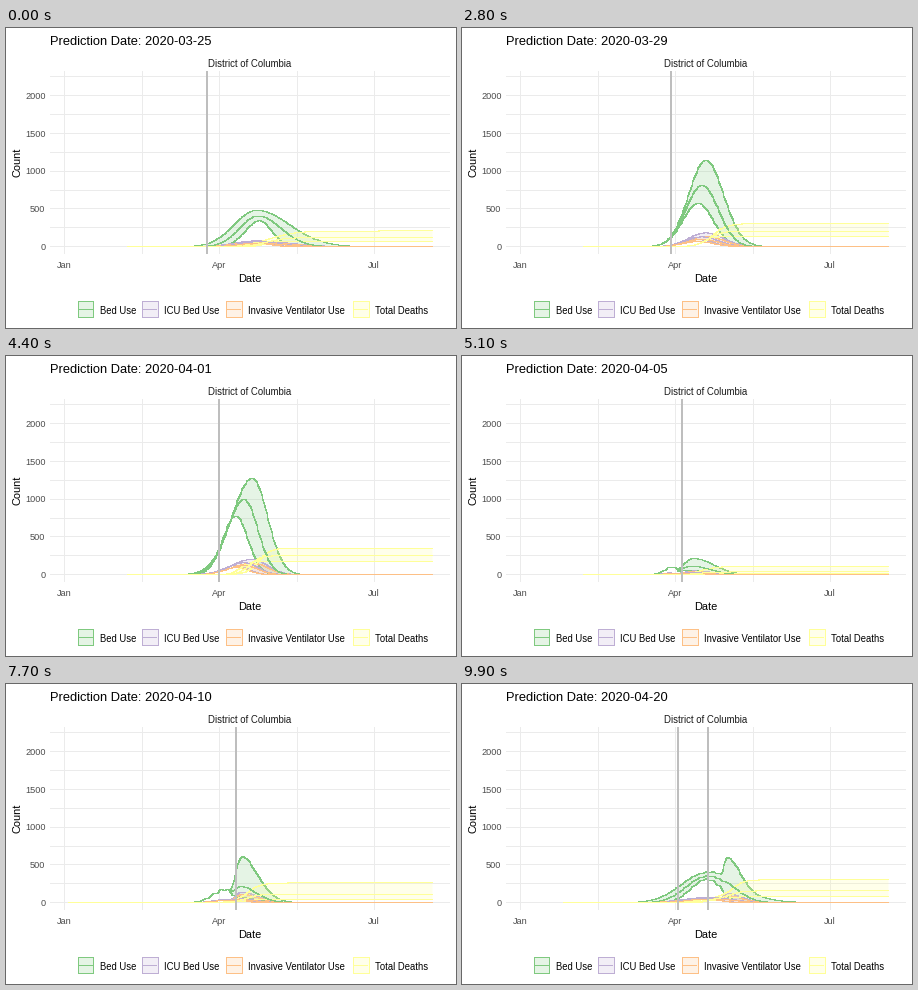
Write a matplotlib script that moves like this. It is 450 by 300 pixels and loops after 10000 ms.

```python
import numpy as np
import matplotlib
import matplotlib.pyplot as plt
from matplotlib.animation import FuncAnimation
from matplotlib.patches import Polygon, Rectangle

matplotlib.rcParams["font.family"] = "Liberation Sans"

W, H, DPI = 450, 300, 100
PT = 72 / DPI                      # points per pixel
LEFT, RIGHT, TOP, BOTTOM = 44, 444, 43, 226
ZERO, SCALE = 218.2, 0.0755        # pixel row of count 0, pixels per count
JAN, PER_DAY = 58.25, 155 / 91     # pixel column of 1 January, pixels per day
END, SAMPLES = 426, 366            # last column of the curves, points per curve

GROUPS = [("Bed Use", "#7FC97F", 79.5), ("ICU Bed Use", "#BEAED4", 144),
          ("Invasive Ventilator Use", "#FDC086", 228), ("Total Deaths", "#FFFF99", 355)]

# day of year (1 January = 0) of each prediction, and the frame it settles on
DAYS = [84, 85, 86, 88, 89, 90, 91, 95, 97, 98, 100, 103, 107, 110]
ARRIVE = [0, 6, 15, *range(23, 94, 7), 100]
FRAMES = ARRIVE[-1]

# (low, high) of: peak column, peak beds, rise width, fall width, deaths
FIRST = np.array([(253, 250), (342, 482), (14, 22), (12.5, 33), (70, 208)])
MAR29 = np.array([(237, 243), (550, 1125), (16, 16.5), (15, 18), (135, 300)])
MAR31 = np.array([(232, 245), (700, 1225), (14, 19), (13, 16), (165, 335)])
APR05 = np.array([(226, 231), (60, 215), (10, 10), (18, 20), (12, 110)])
APR08 = np.array([(229, 229), (72, 468), (8, 5), (16, 19), (30, 180)])
APR17 = np.array([(238, 242), (85, 920), (8, 5), (17, 15), (85, 425)])


def mix(a, b, t):
    return a + (b - a) * t


def column(day):
    return JAN + day * PER_DAY


def row(count):
    return ZERO - count * SCALE


def pixel(v):
    return np.round(v) + 0.5       # centre of the nearest pixel


# ---- curves -------------------------------------------------------------
def plan(day):
    if day < 88:
        return FIRST
    if day < 95:
        return mix(MAR29, MAR31, (day - 88) / 2)
    if day < 98:
        return APR05
    return mix(APR08, APR17, (day - 98) / 9)


def bell(x, peak, height, left, right):
    return height * np.exp(-0.5 * ((x - peak) / np.where(x < peak, left, right)) ** 2)


def observed(x, day):
    """Beds reported so far: a slightly jagged rise that ends before today."""
    cut = column(day) - 10
    age = cut - 210
    return bell(x, cut, 100 + 8 * age, 8 + age / 2, 5) * (1 + 0.1 * np.sin(0.8 * x))


def curves(day):
    """Columns and the (group, low/mid/high, column) counts of one prediction."""
    x = np.linspace(121 if day < 98 else 62, END, SAMPLES)
    peak, beds, left, right, deaths = plan(day)
    peak, left, right = (np.linspace(*p, 3)[:, None] for p in (peak, left, right))
    beds, deaths = (np.geomspace(*p, 3)[:, None] for p in (beds, deaths))

    use = bell(x, peak, beds, left, right)
    icu, vent = 0.16, 0.12
    if day >= 95:
        use = np.maximum(use, observed(x, day))
        icu, vent = 0.23, 0.18
    spread = 0.4 * right
    dead = deaths / (1 + np.exp(-(x - peak - spread) / spread))
    return x, np.array([use, use * icu, use * vent, dead])


STATES = [curves(day) for day in DAYS]

# ---- static parts -------------------------------------------------------
fig = plt.figure(figsize=(W / DPI, H / DPI), dpi=DPI, facecolor="white")
ax = fig.add_axes([0, 0, 1, 1])
ax.set_xlim(0, W)
ax.set_ylim(H, 0)
ax.axis("off")


def thin(x, y, color, z=0):
    """A crisp line one pixel wide."""
    return ax.plot(x, y, color=color, lw=0.5 * PT, antialiased=False, snap=False,
                   solid_capstyle="butt", zorder=z)[0]


def label(x, y, text, size, color="black", **kw):
    return ax.text(x, y, text, size=size * PT, color=color, **kw)


GRID, GREY = "#EBEBEB", "#4D4D4D"
for count in range(0, 2251, 250):
    thin([LEFT, RIGHT], [pixel(row(count))] * 2, GRID)
    if count % 500 == 0:
        label(39.5, row(count) + 3.8, str(count), 9.2, GREY, ha="right")
for day, month in ((0, "Jan"), (45.5, ""), (91, "Apr"), (136.5, ""), (182, "Jul")):
    thin([pixel(column(day))] * 2, [TOP, BOTTOM], GRID)
    label(column(day), 240.5, month, 9.2, GREY, ha="center")

label(244, 254, "Date", 11, ha="center")
label(11.5, 134.5, "Count", 11, ha="center", va="center", rotation=90)
label(244, 39, "District of Columbia", 9.7, "#1A1A1A", ha="center")
title = label(44, 17, "", 12.9)

for name, color, cx in GROUPS:
    x0, x1 = pixel(cx - 7.9), pixel(cx + 7.9)
    y0, y1 = 273.5, 289.5
    ax.add_patch(Rectangle((x0, y0), x1 - x0, y1 - y0, fc=color, alpha=0.2, lw=0))
    thin([x0, x1, x1, x0, x0], [y0, y0, y1, y1, y0], color)
    thin([cx - 7, cx + 7], [281.5, 281.5], color)
    label(cx + 14.3, 285.5, name, 9.55)

# ---- moving parts -------------------------------------------------------
bands, edges, lines = [], [], []
for i, (name, color, cx) in enumerate(GROUPS):
    z = 2 + i / 10
    bands.append(ax.add_patch(Polygon([(0, 0)] * 3, fc=color, alpha=0.2, lw=0, zorder=z)))
    edges.append([thin([], [], color, z + 0.05) for _ in range(2)])
    lines.append(thin([], [], color, z + 1))

bar, rest = (ax.add_patch(Rectangle((0, TOP), 2, BOTTOM - TOP, fc="#BEBEBE", lw=0, zorder=4))
             for _ in range(2))


def place(mark, day):
    mark.set_x(np.round(column(day)) - 1)


def update(n):
    k = max(i for i, a in enumerate(ARRIVE) if a <= n)
    nxt = (k + 1) % len(DAYS)
    steps = 4 if k == 2 else 3
    t = max(0, n - ARRIVE[k + 1] + steps) / steps

    date = np.datetime64("2020-01-01") + DAYS[k]
    title.set_text(f"Prediction Date: {date}")
    place(bar, mix(DAYS[k], DAYS[nxt], t))
    place(rest, DAYS[k])
    rest.set_visible(nxt == 0)     # the last marker lingers while the other returns

    x, counts = (mix(a, b, t) for a, b in zip(STATES[k], STATES[nxt]))
    x, rows = pixel(x), pixel(row(counts))
    for (low, mid, high), band, (bottom, top), line in zip(rows, bands, edges, lines):
        band.set_xy(np.column_stack([np.r_[x, x[::-1]], np.r_[high, low[::-1]]]))
        bottom.set_data(x, low)
        top.set_data(x, high)
        line.set_data(x, mid)
    return [title, bar, rest, *bands, *lines]


anim = FuncAnimation(fig, update, frames=FRAMES, interval=100, repeat=True,
                     repeat_delay=0, blit=False)
plt.show()
```
